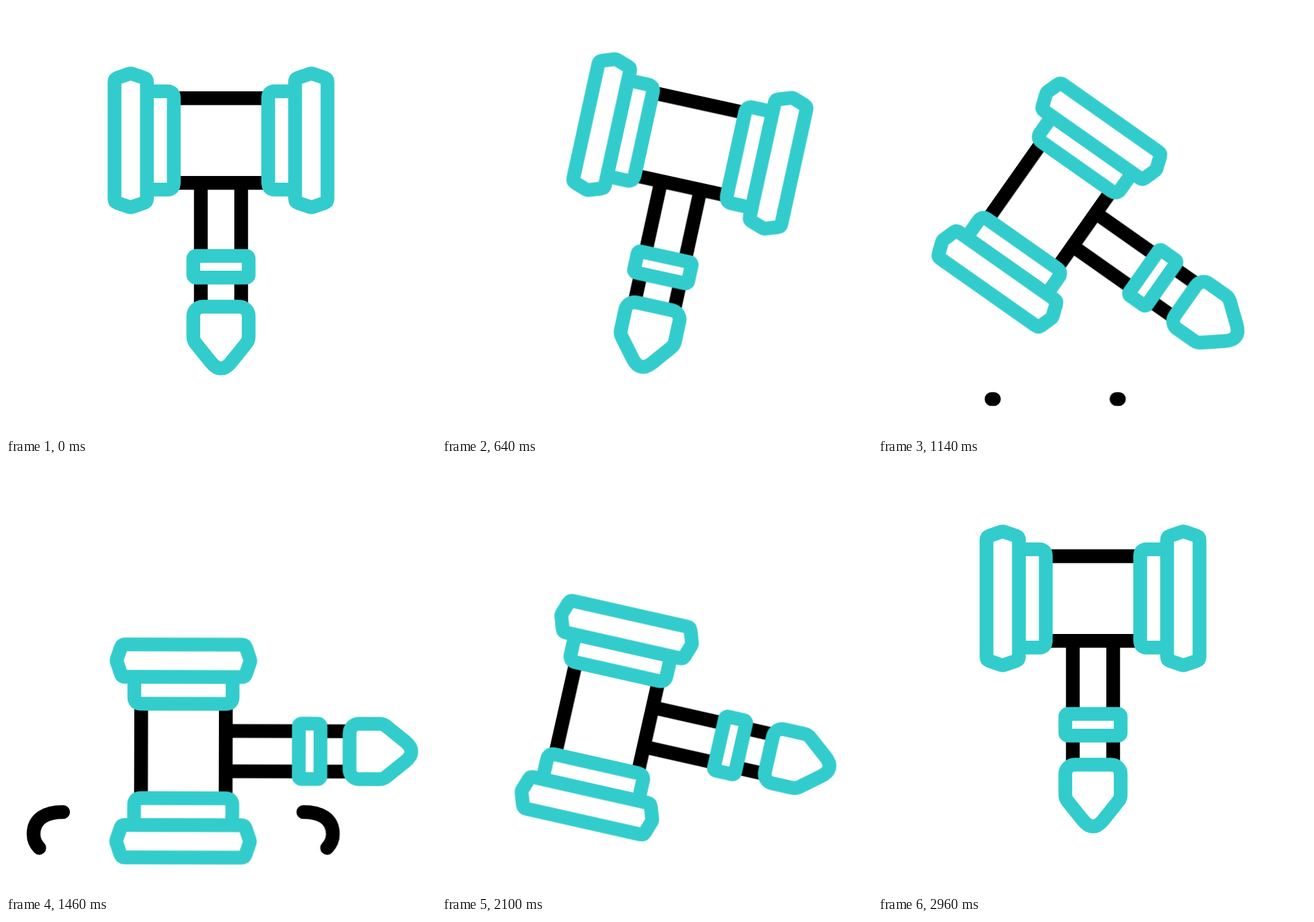
Recreate the animation shown at these times as an HTML page. Size 640 by 640 pixels, loop 3 s.

```html
<!DOCTYPE html>
<html lang="en">
<head>
<meta charset="utf-8">
<title>Gavel</title>
<style>
  html, body { margin: 0; width: 100%; height: 100%; overflow: hidden; background: #fff; }
  svg { display: block; width: 100%; height: 100%; }
  path, rect { fill: none; stroke-width: 20.5; }
  .black { stroke: #000; }
  .teal { stroke: #3cc; stroke-linejoin: round; }
  .solid { fill: #fff; }

  .gavel {
    transform-origin: 320px 429px;
    animation: strike 3s infinite;
  }
  .dust {
    stroke-linecap: round;
    stroke-dasharray: 0.01 300;
    animation: sweep 3s linear infinite, blink 3s step-end infinite;
  }

  /* wind up, hit, return */
  @keyframes strike {
    0% {
      transform: translate(0, 0) rotate(0deg);
      animation-timing-function: cubic-bezier(.81, 0, .945, 1);
    }
    29.333% {
      transform: translate(0, 0) rotate(30deg);
      animation-timing-function: cubic-bezier(.479, 0, .097, 1);
    }
    49.767% {
      transform: translate(173px, -1.25px) rotate(-90deg);
      animation-timing-function: cubic-bezier(.911, 0, .217, 1);
    }
    98.3%, 100% { transform: translate(0, 0) rotate(0deg); }
  }

  @keyframes sweep {
    0%, 37.333% {
      stroke-dasharray: 0.01 300;
      stroke-dashoffset: 0;
      animation-timing-function: cubic-bezier(.42, 0, 1, 1);
    }
    42% { stroke-dasharray: 46 300; stroke-dashoffset: 0; }
    47.333% { stroke-dasharray: 52 300; stroke-dashoffset: -48; }
    53.333%, 100% { stroke-dasharray: 0.01 300; stroke-dashoffset: -99.9; }
  }

  @keyframes blink {
    0% { opacity: 0; }
    36.667% { opacity: 1; }
    53.333%, 100% { opacity: 0; }
  }
</style>
</head>
<body>
<svg viewBox="0 0 640 640">
  <defs>
    <g id="end">
      <path d="M207 127H240Q249.7 127 249.7 137V263Q249.7 273.2 240 273.2H207"/>
      <path d="M161.5 113Q161.5 108.5 165.5 107L183 101Q185.5 100.2 188 101L205.5 107Q209.7 108.5 209.7 113V287Q209.7 291.5 205.5 293L188 299Q185.5 299.8 183 299L165.5 293Q161.5 291.5 161.5 287Z"/>
    </g>
    <path id="puff" pathLength="100" d="M172.5 585H85C60 585 41 570 41 551C41 527 60 518 85 518"/>
  </defs>

  <g class="black dust">
    <use href="#puff"/>
    <use href="#puff" transform="translate(527.5) scale(-1 1)"/>
  </g>

  <g class="gavel">
    <path class="black" d="M250 137.2H390M250 263.2H390M290 263V447M350 263V447"/>
    <g class="teal">
      <use href="#end"/>
      <use href="#end" transform="translate(640) scale(-1 1)"/>
      <rect class="solid" x="278.8" y="372" width="82.4" height="32.2" rx="4"/>
      <path class="solid" d="M293 447.4H347A14.2 14.2 0 0 1 361.2 461.6V492Q361.2 497.7 357.6 502.2L335 530.2Q320 548.7 305 530.2L282.4 502.2Q278.8 497.7 278.8 492V461.6A14.2 14.2 0 0 1 293 447.4Z"/>
    </g>
  </g>
</svg>
</body>
</html>
```
